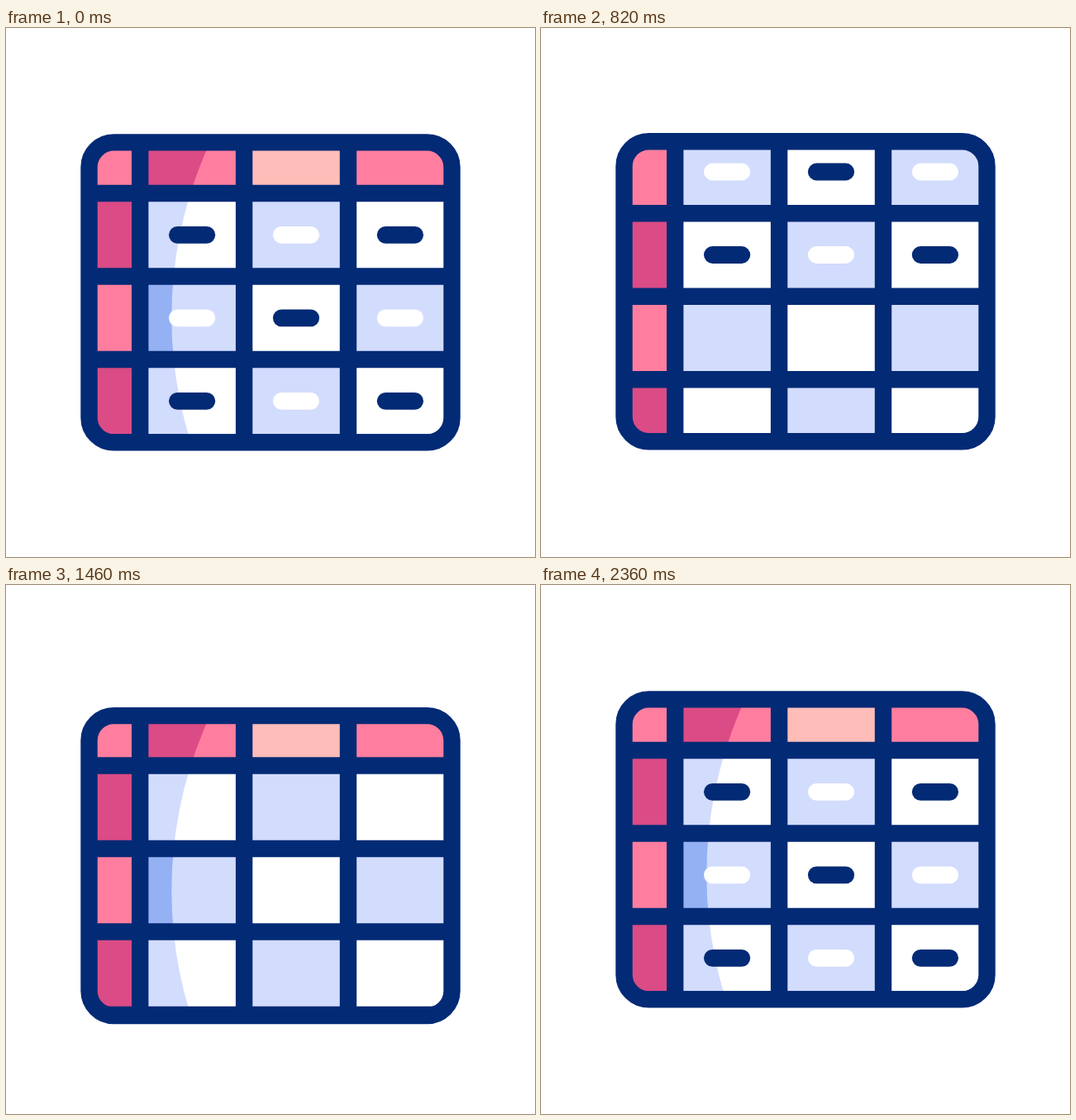
Write an HTML page with a canvas that moves like this. It is 640 px wide and 640 px high and loops after 2.9 s.

```html
<!DOCTYPE html>
<html lang="en">
<head>
<meta charset="utf-8">
<title>Scrolling table</title>
<style>
  html, body { margin: 0; height: 100%; overflow: hidden; background: #fff; }
  canvas { display: block; width: 100vw; height: 100vh; }
</style>
</head>
<body>
<canvas id="stage" width="640" height="640"></canvas>
<script>
const ctx = document.getElementById('stage').getContext('2d');
const LOOP = 2900, PITCH = 100.5, COL = 125.9, LINE = 20.4;
const NAVY = '#032a75', PINK = '#ff7e9f', ROSE = '#db4b85', PEACH = '#ffbdb9',
      LAVENDER = '#d2dcfc', BLUE = '#94b1f3', WHITE = '#ffffff';
const SHADE = { [PINK]: ROSE, [WHITE]: LAVENDER, [LAVENDER]: BLUE };

// [time, value] pairs, eased in and out between neighbours
const BOX = [[240, 0], [560, 11], [700, 11], [1030, -29], [1380, 26], [1710, -15.7], [2040, 0]];
const SCROLL = [[240, 0], [500, 6.8], [1085, -311.6], [1475, 0]];
const SHADOW = [[240, 1], [790, 0], [1085, 0], [1420, 1]];
const CLEARED = 1085, DASH_START = 1502, DASH_STEP = 80, DASH_TIME = 222;

function ease(u) {
  u = Math.min(1, Math.max(0, u));
  return u * u * (3 - 2 * u);
}

function track(keys, t) {
  let value = keys[0][1];
  for (let i = 1; i < keys.length; i++) {
    const [t0, v0] = keys[i - 1], [t1, v1] = keys[i];
    if (t >= t0) value = v0 + (v1 - v0) * ease((t - t0) / (t1 - t0));
  }
  return value;
}

function line(x1, y1, x2, y2, color = NAVY, width = LINE, cap = 'butt') {
  ctx.strokeStyle = color;
  ctx.lineWidth = width;
  ctx.lineCap = cap;
  ctx.beginPath();
  ctx.moveTo(x1, y1);
  ctx.lineTo(x2, y2);
  ctx.stroke();
}

function cellColor(row, col) {
  if (col === 0) return row % 2 ? ROSE : PINK;
  if (row === 0) return col === 2 ? PEACH : PINK;
  return (row + col) % 2 ? LAVENDER : WHITE;
}

// Area left of a large circle that stays fixed to the box
function shadeCell(x, y, w, h, color, alpha) {
  ctx.save();
  ctx.beginPath();
  ctx.rect(x, y, w, h);
  ctx.clip();
  ctx.beginPath();
  ctx.rect(x, y, w, h);
  ctx.moveTo(1210.3, 350);
  ctx.arc(705.3, 350, 505, 0, Math.PI * 2);
  ctx.globalAlpha = alpha;
  ctx.fillStyle = color;
  ctx.fill('evenodd');
  ctx.restore();
}

function dashAmount(index, t) {
  if (t < CLEARED) return 1;
  return ease((t - DASH_START - index * DASH_STEP) / DASH_TIME);
}

function drawRows(t, scroll) {
  const shadow = track(SHADOW, t);
  for (let row = 0; row < 7; row++) {
    // The first and last rows stretch when scrolled past the ends
    const top = row ? 200 + (row - 1) * PITCH + scroll : 100;
    const bottom = row < 6 ? 200 + row * PITCH + scroll : 540;
    if (bottom < 100 || top > 540) continue;
    for (let col = 0; col < 4; col++) {
      const x = 36.3 + col * COL, color = cellColor(row, col);
      ctx.fillStyle = color;
      ctx.fillRect(x, top, COL, bottom - top);
      if (col === 1 && shadow > 0) shadeCell(x, top, COL, bottom - top, SHADE[color], shadow);
      if (row < 1 || row > 3 || col < 1) continue;
      const amount = dashAmount((row - 1) * 3 + col - 1, t);
      if (amount > 0) {
        const dx = 207.4 + (col - 1) * COL, dy = top + 50.3;
        line(dx, dy, dx + 35.4 * amount + 0.01, dy, color === WHITE ? NAVY : WHITE, 20.8, 'round');
      }
    }
  }
  for (let row = 0; row < 6; row++) {
    const y = 200 + row * PITCH + scroll;
    line(100, y, 540, y);
  }
}

function draw(t) {
  ctx.fillStyle = WHITE;
  ctx.fillRect(0, 0, 640, 640);
  ctx.save();
  ctx.translate(0, track(BOX, t));

  const frame = new Path2D();
  frame.roundRect(100.5, 138.4, 439, 363, 30);
  ctx.save();
  ctx.clip(frame);
  drawRows(t, track(SCROLL, t));
  for (let col = 1; col < 4; col++) {
    const x = 36.3 + col * COL;
    line(x, 130, x, 510);
  }
  ctx.restore();

  ctx.strokeStyle = NAVY;
  ctx.lineWidth = LINE;
  ctx.stroke(frame);
  ctx.restore();
}

const start = performance.now();
function tick() {
  draw((performance.now() - start) % LOOP);
  requestAnimationFrame(tick);
}
tick();
</script>
</body>
</html>
```
